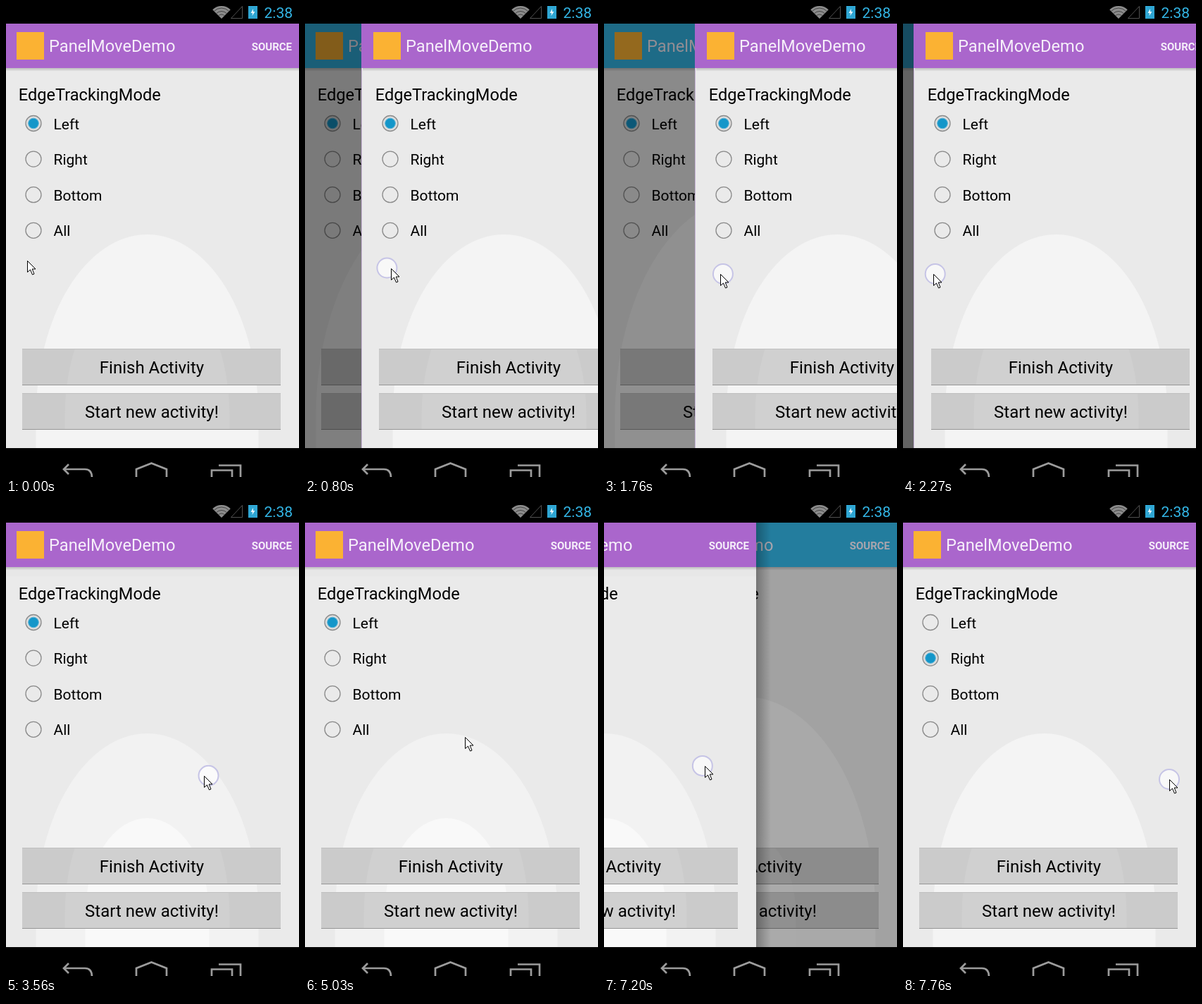
These frames come from a looping animation (416x668 px, 8000 ms). An HTML page with a canvas:

```html
<!DOCTYPE html>
<html lang="en">
<head>
<meta charset="utf-8">
<title>Edge swipe</title>
<style>
html, body { margin: 0; width: 100%; height: 100%; overflow: hidden; background: #000; }
canvas { display: block; width: 416px; height: 668px; }
</style>
</head>
<body>
<canvas id="stage" width="416" height="668"></canvas>
<script>
const ctx = document.getElementById('stage').getContext('2d');
const W = 416, H = 668, TOP = 25, BOTTOM = 627, LOOP = 8000;
const STEP = 130, LAG = 18;
const PURPLE = '#aa66cc', BLUE = '#33b5e5';

// Spans in which the screen refreshes, about every STEP ms.
const spans = [
  [120, 120], [400, 1100], [1370, 2410], [2530, 3560],
  [3700, 4630], [4880, 5840], [5960, 6900], [7050, 7760]
];

// Turning points of the pointer: time, x, y.
const turns = [
  [100, 30, 361], [120, 22, 366], [380, 22, 366],
  [1100, 263, 380], [1345, 263, 380], [2265, 45, 380], [2410, 26, 380],
  [3304, 374, 382], [3560, 281, 384], [4120, 144, 382], [4630, 338, 390],
  [4860, 338, 390], [5290, 33, 222], [5560, 33, 222],
  [6230, 386, 364], [6363, 370, 366], [6900, 96, 369], [7200, 144, 370],
  [7740, 378, 389]
];

const presses = [[400, 2500], [3290, 4600], [5280, 5420], [6340, LOOP]];

function shownTime(t) {
  const span = spans.filter(([start]) => t >= start).pop();
  if (!span) return 0;
  const [start, end] = span;
  const gaps = Math.round((end - start) / STEP);
  if (!gaps) return start;
  const gap = (end - start) / gaps;
  return start + Math.min(gaps, Math.floor((t - start + 12) / gap)) * gap;
}

function pointer(t) {
  const i = Math.max(1, turns.findIndex(p => p[0] >= t));
  const last = t > turns[turns.length - 1][0];
  const [t0, x0, y0] = turns[last ? turns.length - 2 : i - 1];
  const [t1, x1, y1] = turns[last ? turns.length - 1 : i];
  const k = Math.max(0, Math.min(1, (t - t0) / (t1 - t0)));
  return { x: x0 + (x1 - x0) * k, y: y0 + (y1 - y0) * k };
}

function rect(color, x, y, w, h) {
  ctx.fillStyle = color;
  ctx.fillRect(x, y, w, h);
}

function text(s, x, y, size, color = '#000', align = 'left', weight = 400) {
  ctx.font = `${weight} ${size}px Roboto, sans-serif`;
  ctx.textAlign = align;
  ctx.fillStyle = color;
  ctx.fillText(s, x, y);
}

function paint(fill, stroke, width) {
  if (fill) { ctx.fillStyle = fill; ctx.fill(); }
  if (stroke) { ctx.strokeStyle = stroke; ctx.lineWidth = width; ctx.stroke(); }
}

function disc(x, y, r, fill, stroke, width = 1) {
  ctx.beginPath();
  ctx.arc(x, y, r, 0, Math.PI * 2);
  paint(fill, stroke, width);
}

function poly(points, fill, stroke, width = 1, close = true) {
  ctx.beginPath();
  points.forEach(([x, y]) => ctx.lineTo(x, y));
  if (close) ctx.closePath();
  paint(fill, stroke, width);
}

function clipRect(x, y, w, h) {
  ctx.beginPath();
  ctx.rect(x, y, w, h);
  ctx.clip();
}

// Half ellipse on straight sides.
function dome(rx, top, color) {
  const cx = 200.5, cy = 582;
  ctx.beginPath();
  ctx.ellipse(cx, cy, rx, cy - top, 0, Math.PI, Math.PI * 2);
  ctx.lineTo(cx + rx, BOTTOM);
  ctx.lineTo(cx - rx, BOTTOM);
  paint(color);
}

function button(label, y, rx, top) {
  ctx.save();
  clipRect(23, y, 367, 52);
  rect('#cbcbcb', 23, y, 367, 52);
  dome(rx, top, '#d0d0d0');
  rect('#c0c0c0', 23, y, 367, 1);
  rect('#969696', 23, y + 51, 367, 1);
  ctx.restore();
  text(label, 207, y + 35, 24, '#000', 'center');
}

function radio(label, y, on) {
  disc(39, y, 11, on ? '#dcdcdc' : null, '#8b8b8b', 1.3);
  if (on) disc(39, y, 7.3, '#1496c9', '#55b3d8');
  text(label, 67.5, y + 8, 21);
}

function page(x, under, choice, glow) {
  ctx.save();
  clipRect(0, TOP, W, BOTTOM - TOP);
  ctx.translate(x, 0);
  clipRect(0, TOP, W, BOTTOM - TOP);
  rect('#eaeaea', 0, TOP, W, BOTTOM - TOP);
  if (glow) rect('#e7e7e7', 0, 92, W, 9);
  rect('#c6c6c6', 0, 88, W, 2);
  rect('#dadada', 0, 90, W, 2);
  rect(under ? BLUE : PURPLE, 0, TOP, W, 63);
  rect('#fbb233', 15, 37, 39, 39);
  text('PanelMoveDemo', 61, 65, 23.7, '#f6effa');
  text('SOURCE', 406, 63, 15, '#f6effa', 'right', 700);
  if (under) {
    dome(185, 272, '#f4f4f4');
    dome(72, 463, '#f6f6f6');
  } else {
    dome(158, 324, glow ? '#f2f2f2' : '#f4f4f4');
    if (glow) dome(88, 444, '#f9f9f9');
  }
  text('EdgeTrackingMode', 17.7, 134, 23.6);
  ['Left', 'Right', 'Bottom', 'All'].forEach((s, i) =>
    radio(s, 166.5 + i * 50.6, i === choice));
  const shade = under ? [72, 463] : [117, 380];
  button('Finish Activity', 486, ...shade);
  button('Start new activity!', 549, ...shade);
  ctx.restore();
}

function pages(x, choice, glow) {
  if (x) {
    page(0, true, choice, false);
    const dim = 0.6 * (1 - Math.abs(x) / W);
    rect(`rgba(0,0,0,${dim})`, 0, TOP, W, BOTTOM - TOP);
    if (x > 0) {
      rect('#eaeaea', x - 1, 88, 1, BOTTOM - 88);
      rect('#c6b3d6', x - 2, 88, 1, BOTTOM - 88);
      rect(PURPLE, x - 2, TOP, 2, 63);
    } else {
      const g = ctx.createLinearGradient(W + x, 0, W + x + 21, 0);
      g.addColorStop(0, 'rgba(0,0,0,.28)');
      g.addColorStop(1, 'rgba(0,0,0,0)');
      rect(g, W + x, TOP, 21, BOTTOM - TOP);
    }
  }
  page(x, false, choice, glow);
}

function statusBar() {
  const a = Math.PI * 1.25, b = Math.PI * 1.75;
  ctx.beginPath();
  ctx.moveTo(306, 18);
  ctx.arc(306, 18, 18, a, b);
  paint('#8c8c8c');
  for (const r of [6, 10.5, 15]) {
    ctx.beginPath();
    ctx.arc(306, 18, r, a, b);
    paint(null, '#444', 1);
  }
  poly([[319.5, 17.5], [335.5, 17.5], [335.5, 0.5]], null, '#505050');
  rect('#2fa6d3', 344, 0, 13, 18);
  poly([[351, 4], [347.5, 10], [350, 10], [349.5, 14], [353.5, 8], [351, 8]], '#e8f5fb');
  text('2:38', 366.5, 16.5, 21, BLUE);
}

function navBar() {
  const c = '#9c9c9c', w = 2.7;
  poly([[89, 650], [82, 657], [89, 664]], null, c, w, false);
  ctx.beginPath();
  ctx.moveTo(82, 657);
  ctx.lineTo(112, 657);
  ctx.quadraticCurveTo(122, 657, 122, 669);
  ctx.stroke();
  poly([[185, 670], [185, 657], [206.5, 648.5], [228, 657], [228, 670]], null, c, w, false);
  poly([[292, 670], [292, 658.5], [321, 658.5], [321, 670]], null, c, w, false);
  poly([[302, 651.5], [333, 651.5], [333, 668]], null, c, w, false);
}

function arrow(x, y) {
  ctx.save();
  ctx.translate(Math.round(x) + 0.5, Math.round(y) + 0.5);
  poly([[0, 0], [0, 16], [4, 12.5], [7, 19.5], [9.5, 18.5], [6.7, 11.5], [11.5, 11.5]],
    '#fff', '#000');
  ctx.restore();
}

function draw(now) {
  const t = shownTime(now % LOOP);
  const tip = pointer(t), touch = pointer(t - LAG);
  const down = presses.some(([a, b]) => t >= a && t < b);
  let x = 0;
  if (down && t < 2500) x = Math.max(0, (touch.x - 28) * 0.933);
  if (down && t > 6300) x = Math.min(0, (touch.x - 371) * 0.864);

  rect('#000', 0, 0, W, H);
  statusBar();
  pages(Math.round(x), t < 5400 ? 0 : 1, t > 2500 && t < 7600);
  navBar();
  if (down) disc(touch.x, touch.y, 14, 'rgba(255,255,255,.65)', '#c6c4e6', 2);
  arrow(tip.x, tip.y);
}

const begin = performance.now();
function tick() {
  draw(performance.now() - begin);
  requestAnimationFrame(tick);
}
tick();
</script>
</body>
</html>
```
